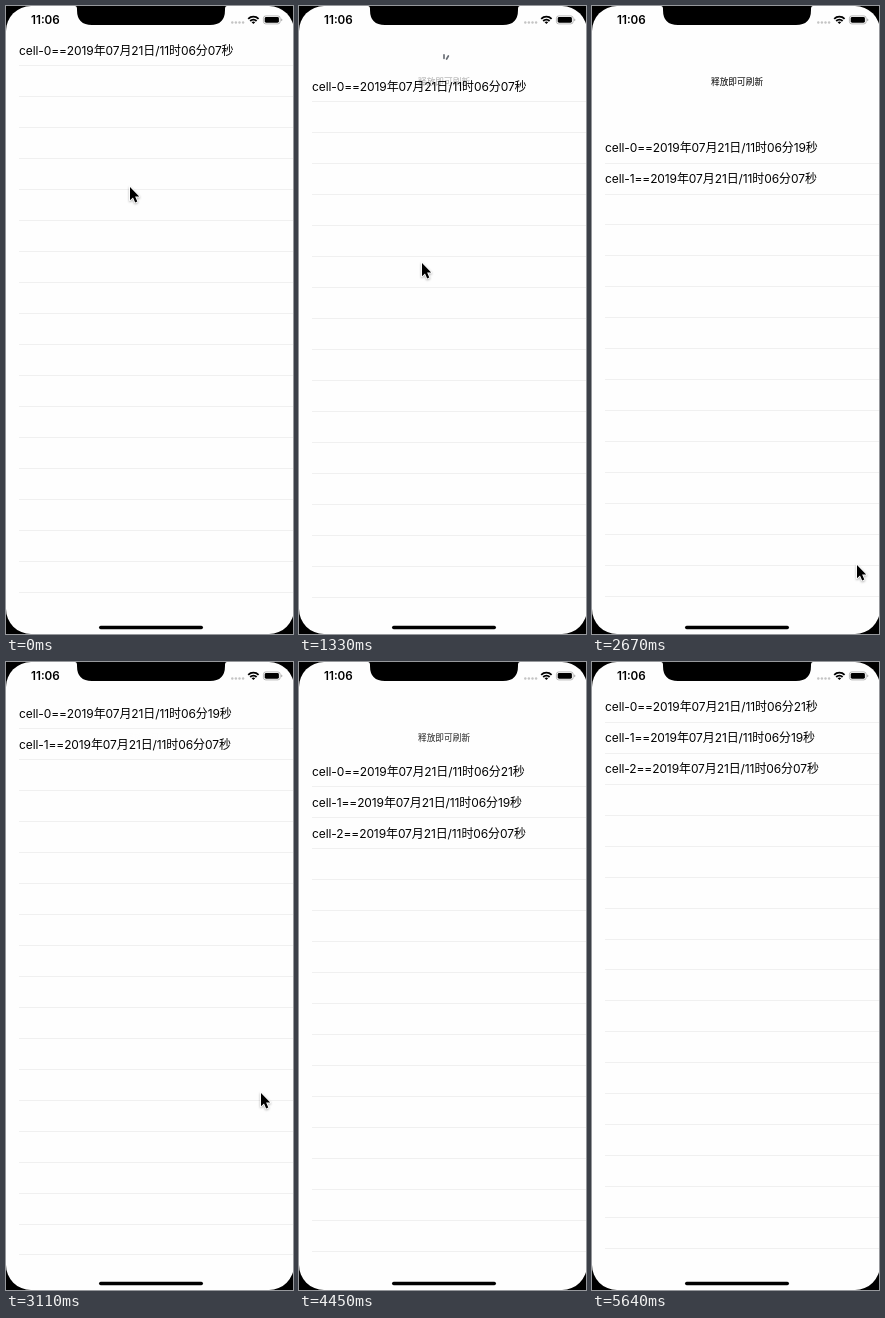
An HTML page that plays this animation: 287 px wide and 628 px high, repeating every 6.38 s.

```html
<!DOCTYPE html>
<html lang="zh-CN">
<head>
<meta charset="utf-8">
<title>Pull to refresh</title>
<style>
  html, body { margin: 0; width: 100%; height: 100%; overflow: hidden; background: #000; }
  svg { display: block; width: 287px; height: 628px; }
  text { font-family: Inter, "Noto Sans CJK SC", "Noto Sans CJK", sans-serif; fill: #000; }
  .row { font-size: 12px; letter-spacing: -0.1px; }
  .label { font-size: 8.7px; text-anchor: middle; }
  .clock { font-size: 11.7px; font-weight: 600; }
  .line { fill: #f0f0f0; }
  #ticks line { stroke: #6b7077; stroke-width: 1.7; stroke-linecap: round; }
  #cursor { filter: drop-shadow(0 1px 1px rgba(0, 0, 0, .3)); }
</style>
</head>
<body>
<svg viewBox="0 0 287 628">
  <rect width="287" height="628"/>
  <rect width="288" height="628" rx="25" fill="#fefefe"/>
  <text id="label" class="label" x="145" y="79">释放即可刷新</text>
  <g id="ticks" transform="translate(145 57.5)"></g>
  <g id="list"></g>

  <path d="M69 0H221Q219 0 219 3V4Q219 19 204 19H86Q71 19 71 4V3Q71 0 69 0Z"/>
  <text class="clock" x="25" y="18">11:06</text>
  <g id="signal" fill="#c4c4c4"></g>
  <g fill="none" stroke="#000" stroke-width="1.8">
    <path d="M242.2 12.9A7.3 7.3 0 0 1 252.6 12.9"/>
    <path d="M244.2 15A4.5 4.5 0 0 1 250.6 15"/>
  </g>
  <path d="M247.4 18L245.6 16.3A2.6 2.6 0 0 1 249.2 16.3Z"/>
  <rect x="257.4" y="9.9" width="16.8" height="8" rx="2.4" fill="none" stroke="#a8a8a8" stroke-width=".8"/>
  <rect x="258.7" y="11.1" width="14.2" height="5.6" rx="1.4"/>
  <path d="M275.2 12.5Q276.4 13 276.4 13.9T275.2 15.3Z" fill="#a8a8a8"/>
  <rect x="93" y="619.8" width="104" height="3.4" rx="1.7"/>

  <path id="cursor" d="M0 0V13.2L3 10.4L5.2 15.4L7.3 14.5L5.1 9.6H9.2Z"
        stroke="#fff" stroke-width="1.8" paint-order="stroke" stroke-linejoin="round"/>
</svg>
<script>
const LOOP = 6380, STEPS = 43, STEP = LOOP / STEPS;
const PITCH = 30.96, FIRST_LINE = 59.9, BOTTOM = 602;
const REST = .4;            // the list settles slightly lower after a refresh
const BOUNCE = 1.234;       // spring rate per step
const GRIP = .5314, REACH = 610;
const SECONDS = ["07", "19", "21"];

// Times are in steps; from is the pointer height where the drag takes hold.
const drags = [
  { begin: 5, release: 17, from: 185 },
  { begin: 25, release: 28.82, from: 244.8 },
];
const POINTER_GONE = 30;

// Pointer path: [step, x, y]
const path = [[0, 124, 181], [2, 124, 175], [5, 124, 175], [9, 123, 257], [13, 152, 488],
  [18, 265, 559], [21, 255, 431], [24, 94, 244], [25, 94, 244], [26, 94, 261], [30, 110, 560]];

const $ = id => document.getElementById(id);
const clamp = v => Math.min(1, Math.max(0, v));
const smooth = v => v * v * v * (v * (6 * v - 15) + 10);
const rubber = d => REACH * (1 - 1 / (1 + GRIP * d / REACH));
const spring = x => (1 + x) * Math.exp(-x);

function add(parent, tag, attrs) {
  const el = document.createElementNS("http://www.w3.org/2000/svg", tag);
  for (const k in attrs) el.setAttribute(k, attrs[k]);
  return parent.appendChild(el);
}

// Monotone cubic through the path points
function along(at, col) {
  const slope = i => path[i] && path[i + 1]
    ? (path[i + 1][col] - path[i][col]) / (path[i + 1][0] - path[i][0]) : 0;
  const tangent = i => {
    const a = slope(i - 1), b = slope(i);
    return a * b > 0 ? 2 * a * b / (a + b) : 0;
  };
  const end = path.findIndex(p => p[0] > at);
  if (end < 0) return path[path.length - 1][col];
  const i = end - 1, h = path[end][0] - path[i][0], u = (at - path[i][0]) / h;
  const s = u * u * (3 - 2 * u);
  return path[i][col] * (1 - s) + path[end][col] * s
    + h * u * (1 - u) * ((1 - u) * tangent(i) - u * tangent(end));
}

function pullAt(n, released) {
  const rest = released ? REST : 0;
  const drag = drags.filter(d => d.begin <= n).pop();
  if (!drag) return rest;
  const held = Math.min(n, drag.release);
  const reach = rubber(Math.max(0, along(held, 2) - drag.from));
  return rest + reach * spring(BOUNCE * (n - held));
}

for (let i = 0; i < 4; i++) add($("signal"), "circle", { cx: 226.3 + 3.6 * i, cy: 16.5, r: 1.2 });
const lines = Array.from({ length: 18 }, () =>
  add($("list"), "rect", { class: "line", x: 13, width: 274, height: 1 }));
const rows = SECONDS.map(() => add($("list"), "text", { class: "row", x: 13 }));
const ticks = Array.from({ length: 12 }, (_, i) =>
  add($("ticks"), "line", { y1: -8.7, y2: -5.2, transform: `rotate(${i * 30})` }));

function drawList(pull, seconds) {
  lines.forEach((line, i) => {
    const y = Math.floor(FIRST_LINE + pull + i * PITCH);
    line.setAttribute("y", y);
    line.style.display = y < BOTTOM ? "" : "none";
  });
  rows.forEach((row, i) => {
    const s = seconds[i];
    row.textContent = s ? `cell-${i}==2019年07月21日/11时06分${s}秒` : "";
    row.setAttribute("y", Math.round(FIRST_LINE + pull + i * PITCH - 11));
  });
}

// Ticks appear one by one with the pull, then the full wheel spins.
function drawSpinner(n, pull, dragging) {
  const count = dragging ? Math.round((pull - 16) / 10) : 0;
  ticks.forEach((tick, i) => {
    const age = (n - i + 24) % 12;
    tick.style.opacity = i >= count ? 0 : count >= 12 ? 1 - age * .06 : 1;
  });
}

function draw(n) {
  const released = drags.filter(d => n > d.release).length;
  const dragging = drags.some(d => n >= d.begin && n <= d.release);
  const pull = pullAt(n, released);
  drawList(pull, SECONDS.slice(0, released + 1).reverse());
  drawSpinner(n, pull, dragging);
  $("label").style.opacity = smooth(clamp(pull / 90));
  $("cursor").style.display = n < POINTER_GONE ? "" : "none";
  $("cursor").setAttribute("transform", `translate(${along(n, 1)} ${along(n, 2)})`);
}

const start = performance.now();
let last = -1;

function tick() {
  const t = (performance.now() - start) % LOOP;
  const n = Math.floor(t / STEP + .08) % STEPS;
  if (n !== last) draw(last = n);
  requestAnimationFrame(tick);
}
tick();
</script>
</body>
</html>
```
